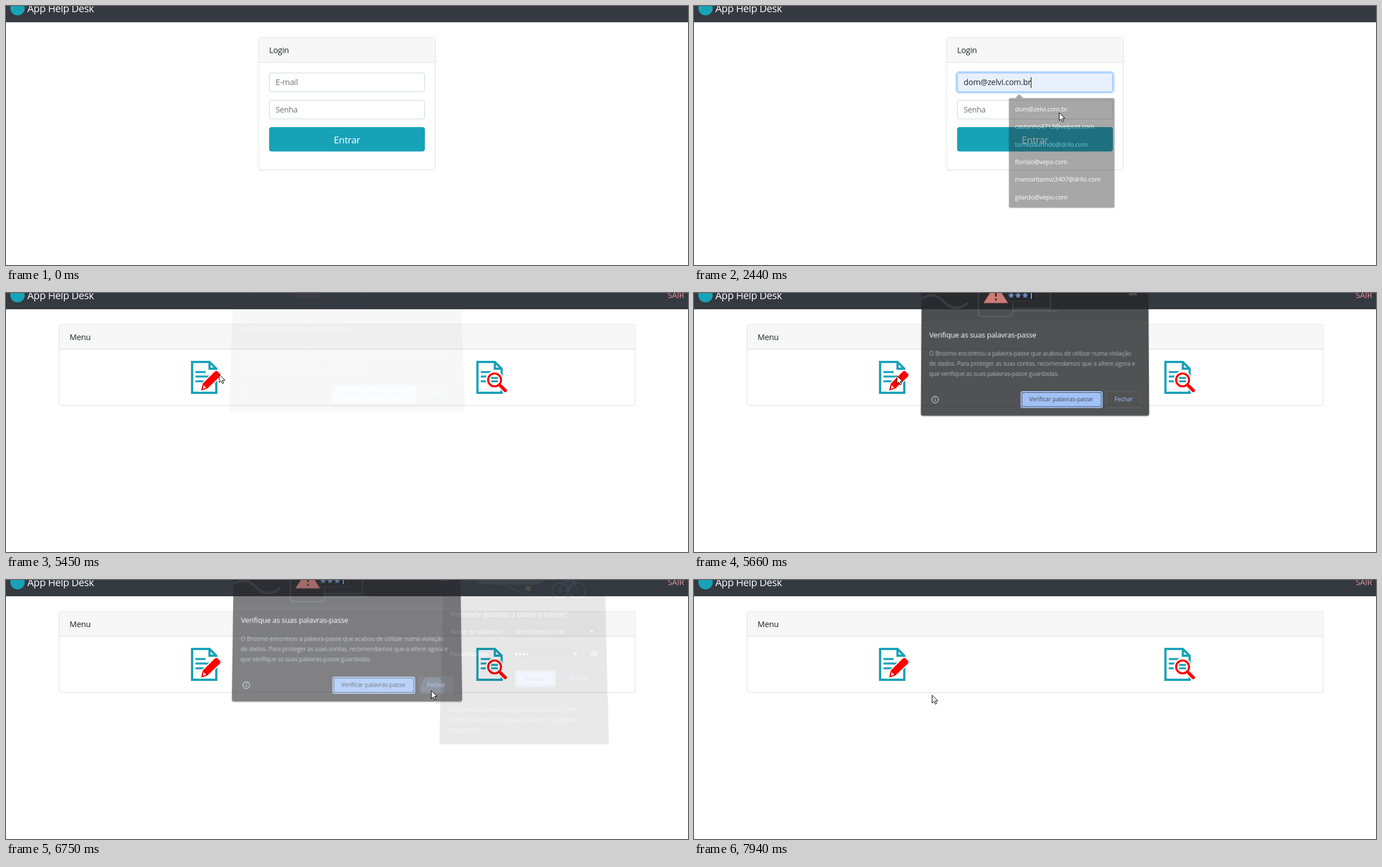
An HTML page that plays this animation: 1213 px wide and 462 px high, repeating every 8000 ms.

```html
<!DOCTYPE html>
<html lang="pt">
<head>
<meta charset="utf-8">
<title>App Help Desk</title>
<style>
  html, body { margin: 0; width: 100%; height: 100%; overflow: hidden; background: #fff; }
  #stage { position: relative; width: 100%; height: 100%; overflow: hidden; contain: strict; }
  svg { position: absolute; left: 0; top: 0; width: 1213px; height: 462px; fill: none; }
  text { font-family: 'Open Sans', sans-serif; letter-spacing: -.02em; fill: #212529; }
  .t14 text { font-size: 14.4px; }
  .dialog text { font-size: 10.7px; fill: #fff; }
  .dialog text.head { font-size: 13.2px; }
  .dialog .muted text { fill: #9aa0a6; }
  .dialog text.dark { fill: #202124; }
  .dialog text.link { fill: #8ab4f8; }
  .dialog { filter: drop-shadow(0 1px 1px #0005); }
  .card { fill: #fff; stroke: #dfdfdf; }
  .input { fill: #fff; stroke: #ced4da; }
  .input.focus { stroke: #80bdff; }
  .ring { stroke: #007bff; stroke-opacity: .25; stroke-width: 3; }
  text.hint { fill: #6c757d; }
  .caret { stroke: #000; }
  .primary { fill: #8ab4f8; }
  .outline { stroke: #8ab4f8; stroke-width: 2; }
  .plain { stroke: #3f4246; }
  .plain.hot { fill: #8ab4f8; fill-opacity: .08; }
  .field { fill: #202124; stroke: #3c4043; }
  .ripple { fill: #8ab4f8; fill-opacity: .18; }
  .dots { stroke-width: 4; stroke-linecap: round; }
</style>
</head>
<body>
<div id="stage">
<svg>
  <defs>
    <g id="doc" stroke="#17a2b8" stroke-width="4">
      <path d="M2 2H33L45 14V57H2ZM33 2V14H45" fill="#fff"/>
      <path d="M8 20H26M8 28H34M8 36.500H30" stroke-width="3.600"/>
    </g>
  </defs>
  <path d="M0 0H1213V29H0Z" fill="#343a40"/>
  <circle cx="20.500" cy="4" r="12.800" fill="#17a2b8"/>
  <text x="38" y="11" font-size="18" style="fill:#fff">App Help Desk</text>

  <g id="login" class="t14">
    <rect class="card" x="449.500" y="56" width="314" height="236.500" rx="3.600"/>
    <path d="M450 100V60q0-3.500 3.500-3.500h306q3.500 0 3.500 3.500V100Z" fill="#f7f7f7"/>
    <path d="M450 100.500H763" stroke="#dfdfdf"/>
    <text x="468" y="84">Login</text>
    <rect id="mailRing" class="ring" x="466.500" y="117.500" width="280" height="37" rx="5"/>
    <rect id="mailBox" class="input" x="468.500" y="119.500" width="276" height="33.500" rx="3.600"/>
    <text id="mailHint" class="hint" x="479.500" y="141">E-mail</text>
    <text id="mailText" x="479.500" y="141">dom@zelvi.com.br</text>
    <path id="mailCaret" class="caret"/>
    <rect id="passRing" class="ring" x="466.500" y="166" width="280" height="37.500" rx="5"/>
    <rect id="passBox" class="input" x="468.500" y="168" width="276" height="33.500" rx="3.600"/>
    <text id="passHint" class="hint" x="479.500" y="190" style="font-size:14px">Senha</text>
    <path id="passDots" class="dots" stroke="#212529" stroke-dasharray="0 6"/>
    <path id="passCaret" class="caret"/>
    <rect x="468" y="216" width="277" height="43.500" rx="4.300" fill="#17a2b8"/>
    <text x="583" y="245" style="font-size:17px;fill:#fff">Entrar</text>
  </g>

  <g id="menu" class="t14">
    <text x="1177" y="9" style="fill:#e8929c">SAIR</text>
    <rect class="card" x="94.500" y="56" width="1024.500" height="144.500" rx="3.600"/>
    <path d="M95 100V60q0-3.500 3.500-3.500h1016.500q3.500 0 3.500 3.500V100Z" fill="#f7f7f7"/>
    <path d="M95 100.500H1118.500" stroke="#dfdfdf"/>
    <text x="113" y="84">Menu</text>
    <g id="icons">
      <use href="#doc" x="329" y="121"/>
      <path d="M371 140.500q3-3 6 0l3.500 3.500q2 3-.500 5.500L358 170.500 347 174 350 161.500Z" fill="red" stroke="#fff" stroke-width="4" paint-order="stroke"/>
      <path d="M351.500 164.500L356 169 350.500 171Z" fill="#fff"/>
      <use href="#doc" x="836.500" y="121"/>
      <path d="M879 165L888 174" stroke="#fff" stroke-width="10"/>
      <circle cx="869" cy="155" r="16" fill="#fff"/>
      <path d="M863 151.500H875M863 157.500H875" stroke="#17a2b8" stroke-width="3.600"/>
      <circle cx="869" cy="155" r="11.500" stroke="red" stroke-width="3.600"/>
      <path d="M880 166L888 174" stroke="red" stroke-width="6" stroke-linecap="round"/>
    </g>
  </g>
</svg>

<svg id="popup" class="dialog" style="transform-origin:654px 262px">
  <path d="M560 161h9l7-7.500 7 7.500h165q3 0 3 3V360q0 3-3 3H560q-3 0-3-3V164q0-3 3-3Z" fill="#292a2d"/>
  <path id="hover" d="M557 165H751V197H557Z" fill="#3f4043"/>
</svg>

<svg id="warning" class="dialog" style="transform-origin:606px 75px">
  <rect x="405" y="-70" width="403" height="290.500" rx="4" fill="#292a2d"/>
  <path d="M405 -70H808V53H405Z" fill="#242528"/>
  <g stroke="#3c4043" stroke-width="2">
    <path d="M405 13C425 0 437 10 447 20S470 34 488 20M443 -4q10 8 18 0" stroke-width="4"/>
    <rect x="506" y="-30" width="61" height="74.500" rx="6"/>
    <path d="M567 30H634V-5M567 34.500H646"/>
  </g>
  <path d="M559 -10H609V17H559Z" fill="#202124" stroke="#3c4043"/>
  <path d="M537 -14L558.500 20.500H515Z" fill="#f28b82"/>
  <path d="M537 -4V9M537 12.500V16" stroke="#292a2d" stroke-width="3"/>
  <text class="link" x="559" y="17" style="font-size:19px;font-weight:700;letter-spacing:2px">***</text>
  <path d="M600 1V13" stroke="#8ab4f8" stroke-width="2"/>
  <path d="M773 7q0-7 7.500-7t7.500 7Z" fill="#4a4d51"/>
  <text class="head" x="419" y="82.500">Verifique as suas palavras-passe</text>
  <g class="muted">
    <text x="419" y="114.500">O Brosmo encontrou a palavra-passe que acabou de utilizar numa violação</text>
    <text x="419" y="132.500">de dados. Para proteger as suas contas, recomendamos que a altere agora e</text>
    <text x="419" y="150.500">que verifique as suas palavras-passe guardadas.</text>
  </g>
  <circle cx="430" cy="192" r="5.800" stroke="#bdc1c6" stroke-width="1.200"/>
  <path d="M430 191V195M430 188.500V190" stroke="#bdc1c6" stroke-width="1.300"/>
  <rect class="outline" x="582" y="178" width="143" height="28" rx="3"/>
  <rect class="primary" x="584" y="180" width="139" height="24" rx="2"/>
  <text class="dark" x="596" y="195.500">Verificar palavras-passe</text>
  <clipPath id="closeClip"><path d="M733 178H793V206H733Z"/></clipPath>
  <rect id="close" class="plain" x="732.500" y="178" width="60.500" height="28" rx="3"/>
  <circle id="closeRipple" class="ripple" cx="756" cy="197" clip-path="url(#closeClip)"/>
  <text class="link" x="747" y="195.500">Fechar</text>
</svg>

<svg id="save" class="dialog" style="transform-origin:921px 115px">
  <rect x="777.500" y="-70" width="288" height="370" rx="4" fill="#292a2d"/>
  <path d="M777.500 216.500H1065.500V296q0 4-4 4H781.500q-4 0-4-4Z" fill="#35363a"/>
  <path d="M777.500 216.500H1065.500" stroke="#3f4246"/>
  <path d="M800 19C835 4 865 10 895 24S940 42 970 42" stroke="#80868b" stroke-width="1.500"/>
  <rect x="830" y="-22" width="132" height="41" rx="19" fill="#80868b"/>
  <path d="M843 2q8 5 14-2M846 -2h14" stroke="#3c4043" stroke-width="3"/>
  <path d="M875 -8L889 1 875 8Z" fill="#fff"/>
  <circle cx="901" cy="0" r="7.500" fill="#3c4043"/>
  <path d="M922 10L912 0 922 -10 932 0Z" fill="#fff"/>
  <circle cx="943.500" cy="0" r="7" stroke="#3c4043" stroke-width="1.500"/>
  <path d="M926 20.500L934 23.500 931 31.500 923 28.500Z" fill="#fdd663"/>
  <g stroke="#8ab4f8" stroke-width="1.500">
    <circle cx="985" cy="30" r="14"/><circle cx="1016" cy="30" r="14"/>
    <path d="M985 30L992 13H1010L1000 31ZM1016 30L1008 4"/>
  </g>
  <path d="M983 -4H1004L1001 8 1004 24H999L994 11 983 7Z" fill="#2a62b0"/>
  <path d="M990 -6H1016V2L1004 0Z" fill="#34785c"/>
  <path d="M998 26h7" stroke="#e8eaed" stroke-width="2.500"/>
  <text class="head" x="792" y="78">Pretende guardar a palavra-passe?</text>
  <text x="792" y="108">Nome de utilizador</text>
  <rect class="field" x="898.500" y="90.500" width="152" height="28" rx="2"/>
  <text x="905" y="108">dom@zelvi.com.br</text>
  <text x="792" y="148">Palavra-passe</text>
  <rect class="field" x="898.500" y="130.500" width="123" height="27.500" rx="2"/>
  <path class="dots" d="M908 144.500h18.700" stroke="#fff" stroke-dasharray="0 6.200"/>
  <path d="M1036 102h8l-4 4.500ZM1007 142h8l-4 4.500Z" fill="#e8eaed"/>
  <path d="M1037 144q7-10 14 0q-7 10-14 0Z" fill="#9aa0a6"/>
  <circle cx="1044" cy="144" r="2.300" fill="#9aa0a6" stroke="#292a2d" stroke-width="1.300"/>
  <rect class="outline" x="907" y="174" width="68" height="27" rx="3"/>
  <rect class="primary" x="909" y="176" width="64" height="23" rx="2"/>
  <text class="dark" x="921" y="191">Guardar</text>
  <clipPath id="neverClip"><path d="M983 173.500H1051V202H983Z"/></clipPath>
  <rect id="never" class="plain" x="982.500" y="173.500" width="68" height="28" rx="3"/>
  <circle id="neverRipple" class="ripple" cx="1016" cy="187" clip-path="url(#neverClip)"/>
  <text class="link" x="1001" y="191">Nunca</text>
  <g class="muted">
    <text x="792" y="244">As palavras-passe são guardadas na sua Conta</text>
    <text x="792" y="262">Vondle para que as possa utilizar em qualquer</text>
    <text x="792" y="280">dispositivo.</text>
  </g>
</svg>

<svg>
  <g id="cursor">
    <path id="arrow" d="M.500 .500V14.500L3.800 11.500 6.200 16.500 8.500 15.500 6.200 10.700H10.800Z" fill="#fff" stroke="#000"/>
    <path id="beam" d="M-3.500 -6.500h2.500q1 0 1 1q0-1 1-1h2.500M0 -6V6M-3.500 6.500h2.500q1 0 1-1q0 1 1 1h2.500" stroke="#000" stroke-width="1.200"/>
  </g>
</svg>
</div>

<script>
const LOOP = 8000;
const $ = id => document.getElementById(id);
const show = (id, on) => $(id).style.display = on ? '' : 'none';
const ramp = (t, a, b) => Math.min(1, Math.max(0, (t - a) / (b - a)));
const within = (t, a, b) => t >= a && t < b;

const mails = ['dom@zelvi.com.br', 'castanho4713@velpost.com', 'torreslaurindo@drilo.com',
  'florisio@vepo.com', 'mamoritamvz3407@drilo.com', 'gilardo@vepo.com'];
mails.forEach((mail, i) => $('popup').insertAdjacentHTML('beforeend',
  `<text x="568" y="${185.5 + 32.4 * i}" style="font-size:11.6px">${mail}</text>`));

// Pointer stops: time, x, y
const path = [
  [70, 1078, 438], [350, 930, 330], [630, 705, 165], [700, 661, 141], [840, 672, 146],
  [1780, 672, 146], [1830, 677, 153], [1900, 677, 153], [1970, 668, 172], [2100, 649, 190],
  [2510, 649, 190], [2650, 640, 186], [2850, 636, 187], [5120, 636, 187], [5300, 500, 165],
  [5450, 379, 145], [5550, 354, 142], [5720, 364, 150], [5930, 364, 150], [6200, 560, 180],
  [6500, 756, 197], [6780, 756, 197], [7000, 900, 205], [7220, 1066, 200], [7500, 1008, 187],
  [7680, 1008, 187], [7800, 720, 200], [7940, 423, 205]
];

function pointerAt(t) {
  const i = path.findIndex(stop => stop[0] > t);
  if (i < 0) return path[path.length - 1].slice(1);
  if (i === 0) return path[0].slice(1);
  const a = path[i - 1], b = path[i], k = ramp(t, a[0], b[0]);
  return [a[1] + (b[1] - a[1]) * k, a[2] + (b[2] - a[2]) * k];
}

function fade(id, p, transform) {
  show(id, p > 0);
  $(id).style.opacity = p;
  $(id).style.transform = p < 1 ? transform(1 - p) : 'none';
}

const tilt = q => `perspective(1000px) translateY(${-14 * q}px) rotateX(${10 * q}deg) scale(${1 + .015 * q})`;
const shrink = q => `scale(${1 - .054 * q})`;

function highlight(id, x, y) {
  const box = $(id).getBBox();
  $(id).classList.toggle('hot', within(x, box.x, box.x + box.width) && within(y, box.y, box.y + box.height));
}

function drawLogin(t) {
  const mailFocus = within(t, 910, 2650), passFocus = t >= 2650, filled = t >= 1970;
  show('mailRing', mailFocus);
  show('passRing', passFocus);
  $('mailBox').classList.toggle('focus', mailFocus);
  $('passBox').classList.toggle('focus', passFocus);
  $('mailBox').style.fill = filled ? '#e8f0fe' : '';
  show('mailHint', !filled);
  show('mailText', filled);
  show('mailCaret', within(t, 910, 1430) || within(t, 2240, 2650));
  $('mailCaret').setAttribute('d', `M${filled ? 599.5 : 480.5} 127V146`);

  const typed = [3310, 3440, 3580, 3780].filter(key => t >= key).length;
  show('passHint', !typed);
  show('passDots', typed);
  $('passDots').setAttribute('d', `M482.600 185.500h${Math.max(0, 6 * (typed - 1)) + .1}`);
  show('passCaret', within(t, 2650, 3180) || within(t, 3310, 4310));
  $('passCaret').setAttribute('d', `M${(typed ? 479.5 : 480.5) + 6 * typed} 175V194`);
}

function draw(t) {
  const onLogin = t < 4720;
  show('login', onLogin);
  show('menu', !onLogin);
  show('icons', t >= 4850);
  if (onLogin) drawLogin(t);

  fade('popup', Math.min(ramp(t, 880, 1030), 1 - ramp(t, 2370, 2490)), shrink);
  show('hover', within(t, 1970, 2240));
  fade('warning', Math.min(ramp(t, 5440, 5710), 1 - ramp(t, 6670, 6870)), tilt);
  fade('save', Math.min(ramp(t, 6720, 6990), 1 - ramp(t, 7680, 7900)), tilt);
  $('closeRipple').setAttribute('r', 21 * ramp(t, 6510, 6600));
  $('neverRipple').setAttribute('r', 19.5 * ramp(t, 7570, 7650));

  const [x, y] = pointerAt(t);
  const overField = onLogin && x > 468 && x < 745 &&
    (within(y, 119, 154) || (within(y, 168, 202) && !within(t, 910, 2490)));
  highlight('close', x, y);
  highlight('never', x, y);
  show('cursor', t >= 70);
  $('cursor').setAttribute('transform', `translate(${x} ${y})`);
  show('beam', overField);
  show('arrow', !overField);
}

const start = performance.now();
function tick() {
  draw((performance.now() - start) % LOOP);
  requestAnimationFrame(tick);
}
tick();
</script>
</body>
</html>
```
